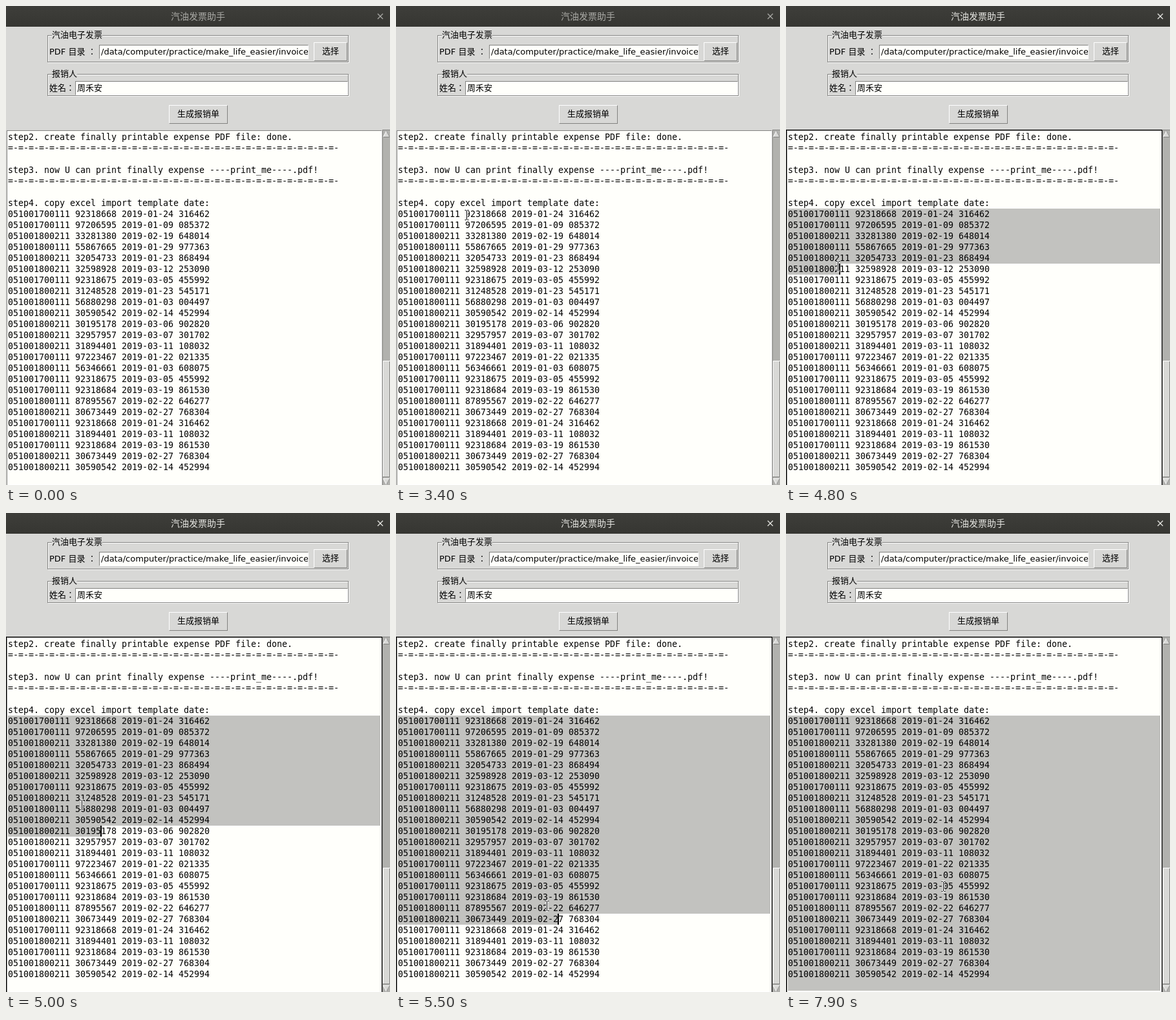
Animation of 594x740 px, one loop 8000 ms. Source, as an HTML page:

```html
<!DOCTYPE html>
<html lang="ja">
<head>
<meta charset="utf-8">
<style>
html, body { margin: 0; width: 100%; height: 100%; overflow: hidden; }
body { position: relative; background: #d8d8d6; color: #000;
  font: 13px/17px "DejaVu Sans", "Noto Sans CJK JP", "Noto Sans CJK", sans-serif; }
body * { position: absolute; box-sizing: border-box; margin: 0; white-space: pre; }
#title { left: 0; top: 0; width: 594px; height: 32px; text-align: center; color: #a9a9a5;
  font-size: 14px; line-height: 32px; background: linear-gradient(#3e3e3a, #363632); }
#title.active { color: #e6e6e2; }
#close { left: 569px; top: 0; width: 20px; font-size: 16px; }
fieldset { left: 64px; width: 466px; padding: 0; border: 1px solid #828280;
  box-shadow: 1px 1px #fff, inset 1px 1px #fff; }
.label { background: #d8d8d6; }
.entry { background: #fffffb; border: 1px solid; border-color: #828280 #fff #fff #828280;
  padding: 1px 2px; overflow: hidden; }
.button { border: 1px solid; border-color: #fff #828280 #828280 #fff; text-align: center; line-height: 26px; }
#text { left: 0; top: 191px; width: 582px; height: 550px; background: #fffffb;
  border: 1px solid #d8d8d6; box-shadow: inset 1px 1px #828280, inset -1px -1px #fff; }
#text.active { border-color: #000; }
#lines { left: 3px; top: 194px; font: 13.29px/17px "DejaVu Sans Mono", monospace; letter-spacing: .004px; }
.sel { left: 3px; background: #c2c2bf; }
#caret { width: 2px; height: 17px; background: #000; }
svg { left: 0; top: 0; }
</style>
</head>
<body>
<div id="title">汽油发票助手<span id="close">×</span></div>

<fieldset style="top:45px;height:42px"></fieldset>
<span class="label" style="left:71px;top:36px">汽油电子发票</span>
<span style="left:67px;top:62px">PDF 目录 ：</span>
<div class="entry" style="left:144px;top:60px;width:324px;height:22px">/data/computer/practice/make_life_easier/invoice</div>
<div class="button" style="left:476px;top:56px;width:52px;height:29px">选择</div>

<fieldset style="top:105px;height:34px"></fieldset>
<span class="label" style="left:71px;top:96px">报销人</span>
<span style="left:67px;top:118px">姓名：</span>
<div class="entry" style="left:107px;top:116px;width:422px;height:22px">周禾安</div>
<div class="button" style="left:252px;top:153px;width:91px;height:29px">生成报销单</div>

<div id="text"></div>
<div id="full" class="sel" style="top:313px;width:576px"></div>
<div id="part" class="sel" style="height:17px"></div>
<pre id="lines"></pre>
<div id="caret"></div>

<svg width="594" height="740">
  <rect x="582" y="191" width="12" height="549" fill="#b1b1ae"/>
  <path d="M582.5 740V191.5H594" fill="none" stroke="#828280"/>
  <path d="M588.5 193L593.5 202.5H583.5Z M583.5 730H593.5L588.5 739.5Z" fill="#d8d8d6" stroke="#fff"/>
  <path d="M583.5 202.5H593.5L588.5 193 M593.5 730L588.5 739.5" fill="none" stroke="#828280"/>
  <rect x="583" y="548" width="11" height="180" fill="#d8d8d6"/>
  <path d="M583.5 728V548.5H594" fill="none" stroke="#fff"/>
  <path d="M583 727.5H593.5V549" fill="none" stroke="#828280"/>
  <g id="beam" fill="none">
    <path d="M-2.5 -7.5H2.5 M-2.5 7.5H2.5 M0 -8V8" stroke="#fff" stroke-width="3"/>
    <path d="M-3 -7.5H-1L0 -6.5L1 -7.5H3 M-3 7.5H-1L0 6.5L1 7.5H3 M0 -7V7" stroke="#000"/>
  </g>
  <path id="arrow" d="M0 0V14L3.3 11L5.5 16L7.8 15L5.6 10.2H10Z" fill="#000" stroke="#fff"/>
</svg>

<script>
const $ = id => document.getElementById(id);
const LOOP = 8000, STEP = 100, SHOW = 500, FOCUS = 4400, RELEASE = 6100;
const ROW = 17, COL = 8, LEFT = 3, TOP = 313;

// number, day and check code; the series follows from the leading digit
const invoices = `92318668 01-24 316462
97206595 01-09 085372
33281380 02-19 648014
55867665 01-29 977363
32054733 01-23 868494
32598928 03-12 253090
92318675 03-05 455992
31248528 01-23 545171
56880298 01-03 004497
30590542 02-14 452994
30195178 03-06 902820
32957957 03-07 301702
31894401 03-11 108032
97223467 01-22 021335
56346661 01-03 608075
92318684 03-19 861530
87895567 02-22 646277
30673449 02-27 768304`.split("\n").map(line => {
  const [number, day, code] = line.split(" ");
  const series = { 9: "7001", 3: "8002" }[number[0]] ?? "8001";
  return `051001${series}11 ${number} 2019-${day} ${code}`;
});
const repeats = [0, 12, 15, 17, 9].map(i => invoices[i]);
const rows = [...invoices.slice(0, 15), invoices[6], ...invoices.slice(15), ...repeats];
const rule = "=-".repeat(32);
$("lines").textContent = [
  "step2. create finally printable expense PDF file: done.", rule, "",
  "step3. now U can print finally expense ----print_me----.pdf!", rule, "",
  "step4. copy excel import template date:", ...rows
].join("\n");

// pointer moves: start, end, x, y, ease-out power
const moves = [
  [500, 800, 136, 231], [900, 1500, 46, 316], [1500, 1800, 67, 301], [1800, 2000, 81, 299],
  [2100, 3200, 222, 308], [3300, 3700, 27, 334, 3], [3800, 4200, 6, 326],
  [4400, 4800, 80, 402], [4890, 5200, 185, 539], [5200, 6000, 313, 720],
  [6100, 6300, 333, 729], [6800, 7300, 243, 577, 2]
];

function pointer(t) {
  let x = 155, y = 79;
  for (const [start, end, toX, toY, power = 1] of moves) {
    const k = Math.min(1, Math.max(0, (t - start) / (end - start)));
    const eased = 1 - (1 - k) ** power;
    x += (toX - x) * eased;
    y += (toY - y) * eased;
  }
  return [x, y];
}

function drawPointer(t) {
  const [x, y] = pointer(t).map(Math.round);
  const inEntry = (y < 82 && x > 144) || (y > 116 && y < 138 && x > 107);
  const shape = y > 191 || inEntry ? "beam" : "arrow";
  for (const id of ["beam", "arrow"]) {
    $(id).setAttribute("transform", `translate(${x + .5} ${y})`);
    $(id).style.display = t >= SHOW && id === shape ? "" : "none";
  }
}

function drawSelection(t) {
  const active = t >= FOCUS;
  // the selection runs slightly ahead of the drawn pointer
  const [x, y] = pointer(Math.min(t + 90, RELEASE));
  const row = active ? Math.floor((y - TOP + 1) / ROW) : 0;
  const atEnd = row >= rows.length;
  const col = active && !atEnd ? Math.round((x - LEFT) / COL) : 0;
  $("title").classList.toggle("active", active);
  $("text").classList.toggle("active", active);
  $("full").style.height = (row + atEnd) * ROW + "px";
  $("part").style.top = $("caret").style.top = TOP + row * ROW + "px";
  $("part").style.width = col * COL + "px";
  $("caret").style.left = LEFT + col * COL - (col > 0) + "px";
  $("caret").style.width = (col ? 2 : 1) + "px";
  const blink = t - FOCUS - 80;
  $("caret").hidden = blink < 0 || blink % 925 > 625;
}

function frame(now) {
  const t = Math.floor(now % LOOP / STEP) * STEP;
  drawPointer(t);
  drawSelection(t);
  requestAnimationFrame(frame);
}
requestAnimationFrame(frame);
</script>
</body>
</html>
```
